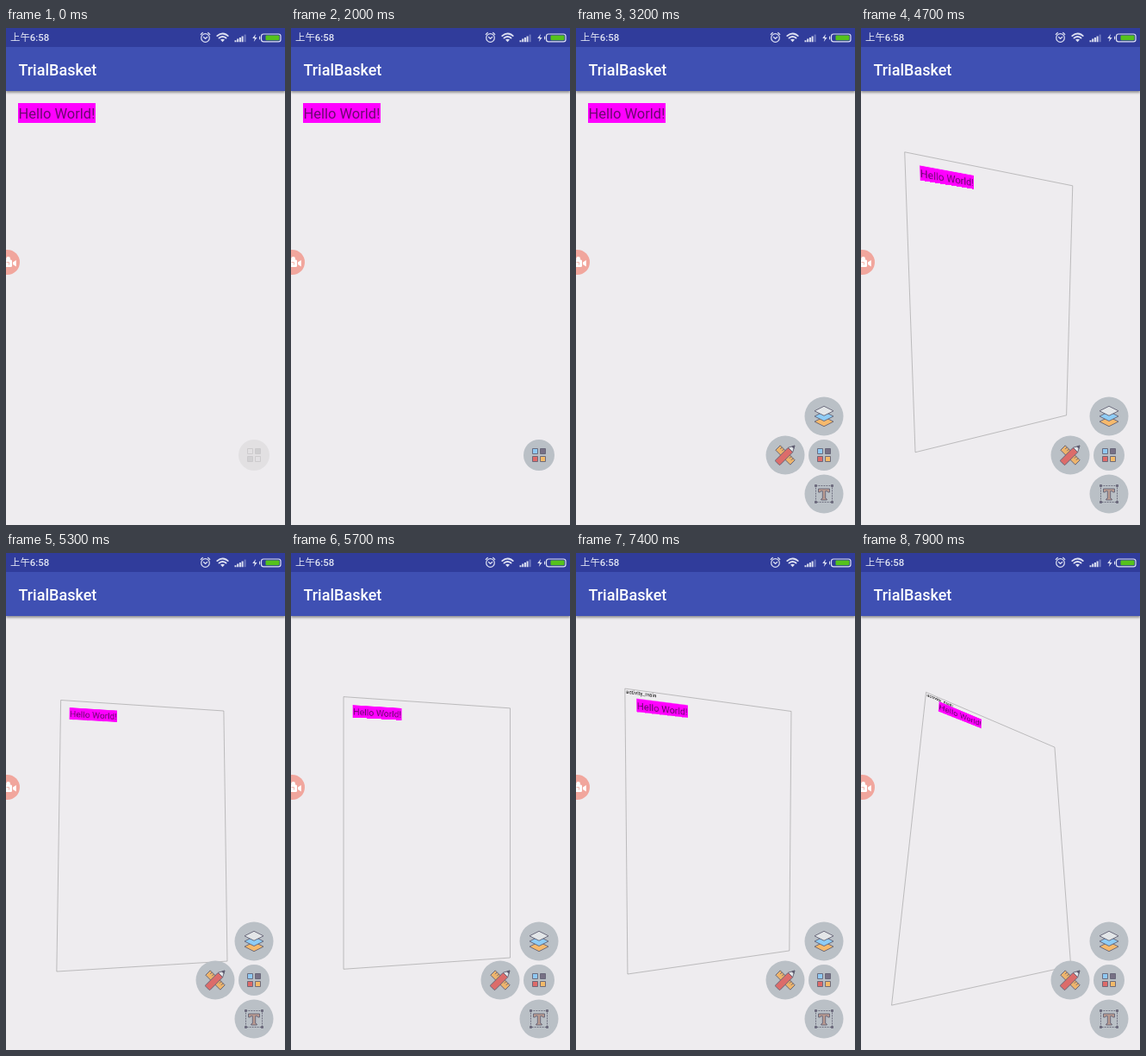
Write an HTML page that moves like this. It is 324x576 px and loops after 8 s.

```html
<!DOCTYPE html>
<html lang="zh">
<head>
<meta charset="utf-8">
<title>Layer view</title>
<style>
  html, body { margin: 0; width: 100%; height: 100%; overflow: hidden; background: #eeecef; }
  #stage { position: relative; width: 324px; height: 576px; overflow: hidden; background: #eeecef; }
  #bar {
    position: absolute; inset: 0 0 auto; height: 73px;
    background: linear-gradient(#303c9b 22.5px, #3f50b3 22.5px);
    box-shadow: 0 1.5px 2.5px rgba(0, 0, 0, .38);
  }
  #plane { position: absolute; left: 0; top: 72.9px; width: 324px; height: 503.1px; }
  #hello, #label { position: absolute; white-space: nowrap; font-family: Roboto, sans-serif; }
  #hello {
    box-sizing: border-box; left: 14.4px; top: 14.4px; width: 89.8px; height: 23px; padding-top: 1px;
    background: #f0f; color: #6c0870; font-size: 16.5px; line-height: 23px;
  }
  #label { left: 1.8px; top: 0; font-size: 8.6px; font-weight: 500; line-height: 11px; color: #333; }
  svg { position: absolute; left: 0; top: 0; }
  .disc { fill: #bac0c6; }
  .ink { stroke: #646275; stroke-width: .9; stroke-linejoin: round; }
  #main.idle { opacity: .25; filter: grayscale(1); }
</style>
</head>
<body>
<div id="stage">
  <div id="bar"></div>
  <div id="plane">
    <div id="label">activity_main</div>
    <div id="hello">Hello World!</div>
  </div>
  <svg width="324" height="576" viewBox="0 0 324 576">
    <polygon id="wire" fill="none" stroke="#888" stroke-width=".5"/>

    <g fill="#e4e7f5" font-family="Roboto, 'Noto Sans CJK SC', 'Noto Sans CJK', sans-serif">
      <text x="5" y="15" font-size="11.4" font-weight="500">上午6:58</text>
      <text x="14.4" y="55.2" font-size="18" font-weight="500" fill="#fff">TrialBasket</text>
    </g>

    <!-- status icons -->
    <g fill="none" stroke="#dde0f2" stroke-width="1.2" stroke-linecap="round">
      <circle cx="231.5" cy="11.5" r="4.8"/>
      <path d="M229.5 10.5l2 2l2.2-2M226.3 7.5l2-2M236.7 7.5l-2-2"/>
      <path d="M245.3 9.1q6.2-5.4 12.4 0M247.5 11.6q4-3.4 8 0" stroke-width="1.9"/>
      <path d="M249 13.6q2.5-1.8 5 0l-2.5 2.6z" fill="#dde0f2" stroke="none"/>
      <path d="M266.5 16.2v-2M269.2 16.2v-3.6M271.9 16.2v-5.2M274.6 16.2v-6.8" stroke-width="2" stroke-linecap="butt"/>
      <path d="M277.6 16.2v-8.6" stroke="#6f79bd" stroke-width="2" stroke-linecap="butt"/>
      <path d="M290 7l-3.8 5h2.6l-1 4l3.8-5h-2.6z" fill="#dde0f2" stroke="none"/>
      <rect x="296.5" y="7" width="22.5" height="8.8" rx="2.6"/>
      <path d="M294.6 10v2.8"/>
      <rect x="301.5" y="8.6" width="16" height="5.6" rx="1" fill="#55c21c" stroke="none"/>
    </g>

    <!-- recorder bubble -->
    <circle cx="1.5" cy="271.5" r="14.5" fill="#f1a69d"/>
    <g fill="#fff">
      <circle cx="2.6" cy="267.5" r="2.4"/>
      <rect x="-6" y="268.5" width="13" height="8.5" rx="1.5"/>
      <path d="M8 271.5l3.8-2.5v7.5l-3.8-2.5z"/>
    </g>
    <path d="M.5 271.5h3v3" fill="none" stroke="#f1a69d" stroke-width=".8"/>

    <g id="main" transform="translate(288 495)">
      <circle class="disc" r="18"/>
      <g class="ink">
        <rect x="-7.5" y="-7.5" width="6" height="6" fill="#8fc8f2"/>
        <rect x="1.5" y="-7.5" width="6" height="6" fill="#777085"/>
        <rect x="-7.5" y="1.5" width="6" height="6" fill="#dd6b69"/>
        <rect x="1.5" y="1.5" width="6" height="6" fill="#f3ba69"/>
      </g>
    </g>

    <g class="satellite">
      <circle class="disc" r="22.5"/>
      <g class="ink">
        <path d="M-11 6.2L0 .7l11 5.5L0 11.7z" fill="#f6b96c"/>
        <path d="M-11 0L0-5.5L11 0L0 5.5z" fill="#8eccf5"/>
        <path d="M-11-6.2L0-11.7l11 5.5L0-.7z" fill="#e3e6e8"/>
      </g>
    </g>
    <g class="satellite">
      <circle class="disc" r="22.5"/>
      <g class="ink">
        <g transform="rotate(45)">
          <rect x="-12" y="-3.8" width="24" height="7.6" fill="#edb46c"/>
          <path d="M-9-3.8v3M-6-3.8v3M6-3.8v3M9-3.8v3" fill="none"/>
        </g>
        <g transform="rotate(-45)">
          <path d="M8.5-3.8l7 3.8l-7 3.8z" fill="#e1e5e8"/>
          <path d="M12.5-1.6l3 1.6l-3 1.6z" fill="#5a586c"/>
          <rect x="-13" y="-3.8" width="21.5" height="7.6" rx="1" fill="#dc6c6a"/>
        </g>
      </g>
    </g>
    <g class="satellite">
      <circle class="disc" r="22.5"/>
      <g class="ink">
        <rect x="-9.5" y="-9.5" width="19" height="19" fill="none" stroke-dasharray="1.8 1.2"/>
        <path d="M-10.5-10.5h2v2h-2zM8.5-10.5h2v2h-2zM-10.5 8.5h2v2h-2zM8.5 8.5h2v2h-2z" fill="#777085"/>
        <path d="M-6.5-6h13v4h-2l-.8-1.3h-2v8.3l1.6 1v1h-6.6v-1l1.6-1v-8.3h-2l-.8 1.3h-2z" fill="#b99a90"/>
      </g>
    </g>
  </svg>
</div>
<script>
  const LOOP = 8000, STEP = 100;
  const WAKE = 2000, MENU_OPEN = 2040, LAYERS_ON = 3400, IDS_ON = 6400;
  const SPACING = 22.5, MAX_ANGLE = 60;
  const HALF_W = 162, HALF_H = 251.55, CENTER_Y = 324.45;

  // time, rotateX, rotateY
  const poses = [
    [4300, 0, 0], [4700, -5, 21], [4900, 9, 21.5], [5000, 10, 20],
    [5300, 2.25, 6.2], [5500, 8, 6.5], [5900, -8, 6.9],
    [7200, -8, 6.9], [7900, 15.3, 30.2]
  ];
  const offsets = [[0, -45], [-45, 0], [0, 45]];

  const byId = id => document.getElementById(id);
  const [plane, hello, label, wire, main] = ['plane', 'hello', 'label', 'wire', 'main'].map(byId);
  const satellites = document.querySelectorAll('.satellite');
  const clamp = x => Math.min(1, Math.max(0, x));

  function overshoot(x, tension = .9) {
    const u = x - 1;
    return u * u * ((tension + 1) * u + tension) + 1;
  }

  function poseAt(t) {
    const i = poses.findIndex(p => p[0] > t);
    if (i === 0) return [0, 0];
    if (i < 0) return poses[poses.length - 1].slice(1);
    const a = poses[i - 1], b = poses[i], k = (t - a[0]) / (b[0] - a[0]);
    return [1, 2].map(n => a[n] + (b[n] - a[n]) * k);
  }

  function drawMenu(t) {
    main.classList.toggle('idle', t < WAKE);
    satellites.forEach((item, i) => {
      const x = clamp((t - MENU_OPEN - (3 - i) * 20) / 500);
      const e = overshoot(x), [dx, dy] = offsets[i];
      item.style.display = x > 0 ? '' : 'none';
      item.setAttribute('opacity', clamp(e));
      item.setAttribute('transform',
        `translate(${288 + dx * e} ${495 + dy * e}) rotate(${720 * e}) scale(${e})`);
    });
  }

  function drawLayers(t) {
    const on = t >= LAYERS_ON;
    wire.style.display = on ? '' : 'none';
    label.style.display = t >= IDS_ON ? '' : 'none';
    if (!on) {
      plane.style.transform = hello.style.transform = 'none';
      return;
    }
    const [rx, ry] = poseAt(t), shift = SPACING / MAX_ANGLE;
    const view = `perspective(259.2px) rotateX(${rx}deg) rotateY(${ry}deg) scale(.6)`;
    plane.style.transform = view;
    hello.style.transform = `translate(${ry * shift}px, ${-rx * shift}px)`;

    const matrix = new DOMMatrix(view);
    const corners = [[-1, -1], [1, -1], [1, 1], [-1, 1]].map(([x, y]) => {
      const p = matrix.transformPoint(new DOMPoint(x * HALF_W, y * HALF_H));
      return [HALF_W + p.x / p.w, CENTER_Y + p.y / p.w];
    });
    wire.setAttribute('points', corners.join(' '));
  }

  function render() {
    const t = Math.floor(performance.now() % LOOP / STEP) * STEP;
    drawMenu(t);
    drawLayers(t);
    requestAnimationFrame(render);
  }
  render();
</script>
</body>
</html>
```
